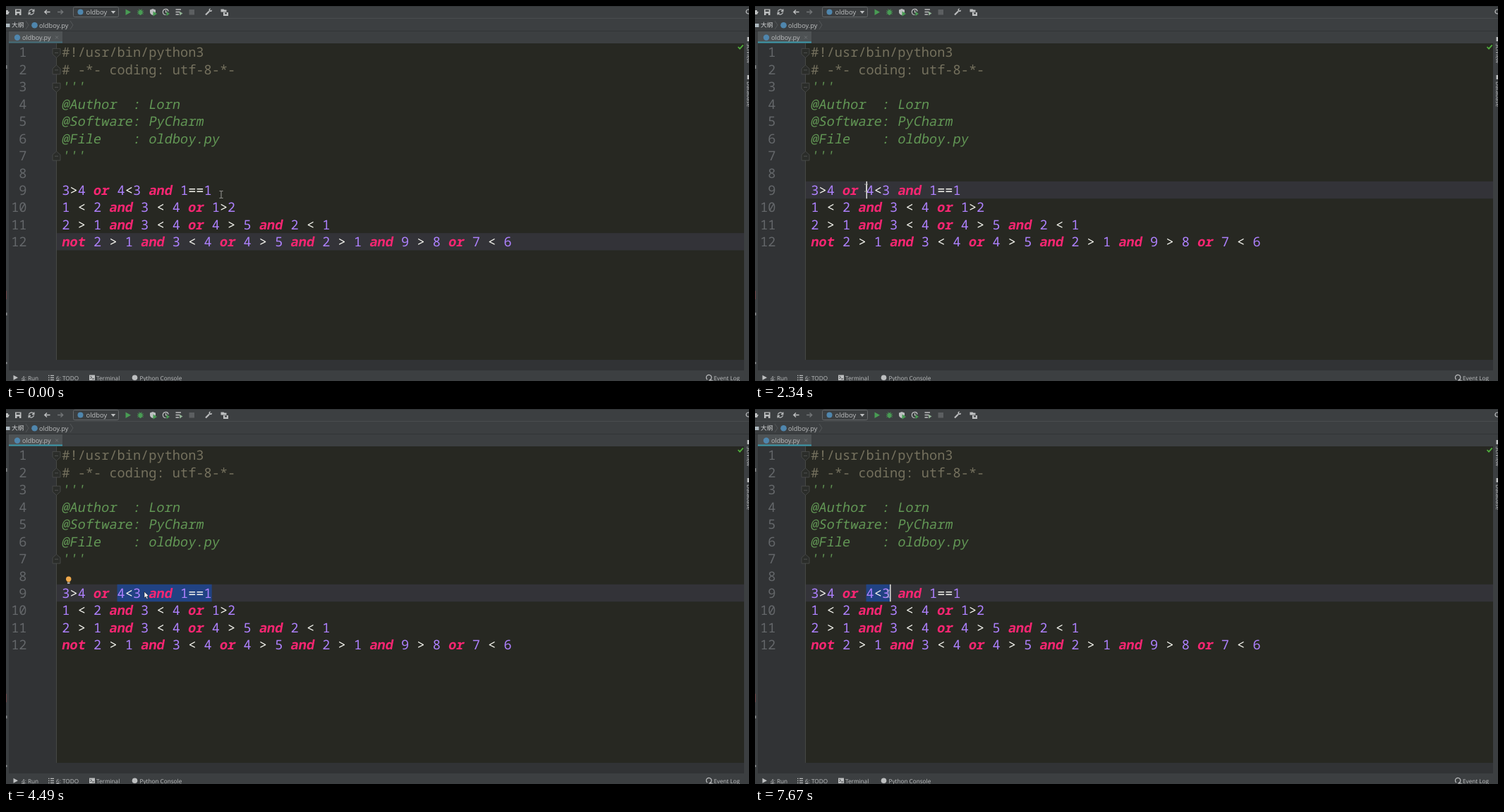
Write an HTML page with a canvas that moves like this. It is 1053 by 532 pixels and loops after 8 s.

```html
<!DOCTYPE html>
<html lang="en">
<head>
<meta charset="utf-8">
<title>Code editor</title>
<style>
  html, body { margin: 0; width: 100%; height: 100%; overflow: hidden; background: #3c3f41; }
  canvas { display: block; }
</style>
</head>
<body>
<canvas id="stage" width="1053" height="532"></canvas>
<script>
const ctx = document.getElementById('stage').getContext('2d');
const LOOP = 8000, STEP = 120;
const LEFT = 79.3, CHAR = 11.18, ROW = 24.45, TOP = 53.2;
const MONO = "18.63px 'Noto Sans Mono', monospace";
const UI = "'Open Sans', 'Noto Sans', sans-serif";
const CJK = "'Noto Sans CJK SC', 'Noto Sans CJK', sans-serif";
const LIGHT = '#bdbfc0', PANEL = '#3c3f41', GUTTER = '#313335';

const code = [
  '#!/usr/bin/python3',
  '# -*- coding: utf-8-*-',
  "'''",
  '@Author  : Lorn',
  '@Software: PyCharm',
  '@File    : oldboy.py',
  "'''",
  '',
  '3>4 or 4<3 and 1==1',
  '1 < 2 and 3 < 4 or 1>2',
  '2 > 1 and 3 < 4 or 4 > 5 and 2 < 1',
  'not 2 > 1 and 3 < 4 or 4 > 5 and 2 > 1 and 9 > 8 or 7 < 6'
];

// Pointer moves: start time, number of steps, destination x and y.
const moves = [
  [120, 2, 201.5, 261], [510, 3, 213.5, 269], [1030, 1, 214, 273],
  [1180, 3, 176.5, 265], [1570, 3, 163, 261], [2060, 1, 157.5, 258],
  [2610, 1, 176, 258], [2760, 2, 213.5, 258], [3030, 2, 261.5, 258],
  [3300, 3, 295, 257], [4100, 3, 202, 258], [4490, 3, 184, 261],
  [6540, 2, 154.5, 257.5], [7130, 1, 155, 257], [7400, 2, 188.5, 262],
  [7670, 1, 189, 262]
];

const rowTop = row => TOP + (row - 1) * ROW;
const colX = col => LEFT + col * CHAR;
const within = (t, from, to) => t >= from && t < to;

function pointerAt(t) {
  let x = 305, y = 267.5;
  for (const [start, steps, toX, toY] of moves) {
    if (t < start) break;
    const part = Math.min(1, (Math.floor((t - start) / STEP) + 1) / steps);
    x += (toX - x) * part;
    y += (toY - y) * part;
  }
  return { x, y, arrow: within(t, 4100, 6540) };
}

// Caret column and end of the selection that starts at column 7.
function editAt(t, pointer) {
  const column = Math.min(19, Math.round((pointer.x - LEFT) / CHAR));
  if (t < 2340) return { caret: -1, end: 7 };
  if (t < 4100 || t >= 7280) return { caret: column, end: column };
  if (t < 6150) {
    const hidden = t < 4730 || within(t, 5290, 5720);
    return { caret: hidden ? -1 : 19, end: 19 };
  }
  return { caret: 9, end: t < 6390 ? 19 : 7 };
}

function rect(x, y, w, h, color) {
  ctx.fillStyle = color;
  ctx.fillRect(x, y, w, h);
}

function disc(x, y, r, color) {
  ctx.fillStyle = color;
  ctx.beginPath();
  ctx.arc(x, y, r, 0, 7);
  ctx.fill();
}

function shape(x, y, d, color, width) {
  ctx.save();
  ctx.translate(x, y);
  const path = new Path2D(d);
  if (width) {
    ctx.strokeStyle = color;
    ctx.lineWidth = width;
    ctx.stroke(path);
  } else {
    ctx.fillStyle = color;
    ctx.fill(path);
  }
  ctx.restore();
}

function label(text, x, y, size, color = LIGHT, family = UI) {
  ctx.font = `${size}px ${family}`;
  ctx.fillStyle = color;
  ctx.fillText(text, x, y);
}

// Draws text on the character grid; slanted text leans about its middle height.
function cells(text, col, row, color, { slant = 0, weight = 400 } = {}) {
  ctx.font = `${weight} ${MONO}`;
  ctx.fillStyle = color;
  ctx.save();
  ctx.translate(colX(col), rowTop(row) + 19.2);
  ctx.transform(1, 0, -slant, 1, -slant * 5, 0);
  [...text].forEach((c, i) => ctx.fillText(c, i * CHAR, 0));
  ctx.restore();
}

function drawToolbar() {
  rect(0, 0, 1053, 1, '#323537');
  rect(0, 17, 1053, 1, '#4a4d4f');
  rect(0, 35, 1053, 1, '#323537');
  shape(0, 9, 'M0-3H3V-1H5L3 3H0Z', LIGHT);
  rect(13, 4.5, 8.5, 8.5, LIGHT);
  rect(14.7, 5.7, 5, 2.3, PANEL);
  rect(15.5, 10.5, 3.5, 2.5, PANEL);
  shape(36, 8.5, 'M-3.5-.5A3.6 3.6 0 0 1 3-2M3.5.5A3.6 3.6 0 0 1-3 2M3.8-4V-1H1M-3.8 4V1H-1', LIGHT, 1.3);
  shape(58.5, 8.5, 'M4 0H-3.5M-.5-3L-3.7 0L-.5 3', LIGHT, 1.4);
  shape(77, 8.5, 'M-4 0H3.5M.5-3L3.7 0L.5 3', '#727577', 1.4);
  shape(95.5, 1.5, 'M2 0H62Q64 0 64 2V12Q64 14 62 14H2Q0 14 0 12V2Q0 0 2 0Z', '#646769', 1);
  disc(105.5, 8.5, 4, '#4f86ad');
  label('oldboy', 113.5, 12, 9.4);
  shape(152, 9, 'M-3.3-2H3.3L0 2Z', LIGHT);
  shape(173, 8.8, 'M-3.5-4.2L4 0L-3.5 4.2Z', '#499c54');
  shape(190.5, 9, 'M-4-2.5L4 2.5M4-2.5L-4 2.5M-4.5 0H4.5M-2-4.5L0-2L2-4.5', '#499c54', 1);
  shape(190.5, 9, 'M-2.5-2Q0-5 2.5-2V2Q0 6-2.5 2Z', '#499c54');
  shape(208, 8.5, 'M-4-3L0-4.5L4-3V0Q3 3 0 4.5Q-4 3-4 0Z', LIGHT);
  shape(211, 11, 'M-2.5-3.5L3 0L-2.5 3.5Z', '#499c54');
  shape(226.5, 8.5, 'M3.7-1A4 4 0 1 0 0 4M0-2.5V.3H2', LIGHT, 1.2);
  shape(229.5, 11, 'M-2-3L2.5 0L-2 3Z', '#499c54');
  shape(245, 8.5, 'M-4.5-3.5H3M-4.5 0H1M-4.5 3.5H0', LIGHT, 1.3);
  shape(247.5, 10.5, 'M-1.5-3L3 0L-1.5 3Z', '#8fae92');
  rect(259.5, 5, 7.5, 7.5, '#5c5f61');
  shape(287, 8.5, 'M-4 4L1-1', LIGHT, 2.2);
  shape(289, 6.5, 'M1-3A2.3 2.3 0 1 0 3-1L1 0L0-1Z', LIGHT);
  shape(308.5, 7.5, 'M-4-3H0L1-2H4V1H-4Z', LIGHT);
  shape(312, 11, 'M-4-2H3V3H-4Z', LIGHT);
  rect(310, 9.5, 3, 2, PANEL);
  shape(1052, 8, 'M3 0A3 3 0 1 1-3 0A3 3 0 1 1 3 0', LIGHT, 1.2);

  rect(0, 25, 5.5, 5, '#aeb9c0');
  label('大纲', 8, 30.3, 8.7, '#d0d2d3', CJK);
  shape(28, 27, 'M0-6L4 0L0 6', '#55585a', 1);
  disc(40.5, 27.3, 4.3, '#4f86ad');
  label('oldboy.py', 47, 30.5, 9.2);
  shape(91, 27, 'M0-6L4 0L0 6', '#55585a', 1);
}

function drawTab(focused) {
  rect(4, 36, 76, 16, '#4e5254');
  rect(4, 50.5, 76, 2, focused ? '#3d9aab' : '#456f7a');
  disc(16, 44.8, 4.2, '#4f86ad');
  label('oldboy.py', 23, 48, 9);
  shape(72, 44.5, 'M-2-2L2 2M2-2L-2 2', '#707476', 0.9);
}

function drawStatusBar() {
  rect(4, 502, 1042, 15, GUTTER);
  shape(13.5, 527.3, 'M-3-3.5L3.5 0L-3 3.5Z', LIGHT);
  label('4: Run', 22, 530.5, 8.2);
  rect(22, 531, 4.5, 0.8, LIGHT);
  shape(64, 527.3, 'M-4-3H-2.5M-1-3H4M-4 0H-2.5M-1 0H4M-4 3H-2.5M-1 3H4', LIGHT, 1.3);
  label('6: TODO', 71, 530.5, 8.2);
  rect(71, 531, 4.5, 0.8, LIGHT);
  rect(118, 523.5, 8, 7.5, LIGHT);
  shape(121, 526.5, 'M-1.5-1.5L.5.5L-1.5 2.5M1 2.5H4', PANEL, 1);
  label('Terminal', 128, 530.5, 8.2);
  disc(182.5, 527.3, 3.8, LIGHT);
  label('Python Console', 189.5, 530.5, 8.2);
  shape(996, 527, 'M-2 3A3.7 3.7 0 1 1 2 3.2L4 4H0', LIGHT, 1.2);
  label('Event Log', 1003, 530.5, 8.2);
}

function drawSides() {
  rect(0, 84, 1.5, 5, '#85888a');
  rect(0, 404, 1, 12, '#6b4446');
  rect(0, 435, 1.5, 4, '#85888a');
  rect(0, 505, 1.5, 3, '#85888a');
  for (const [text, y] of [['SciView', 53], ['Database', 107]]) {
    rect(1050.5, y - 9, 3, 6, LIGHT);
    ctx.save();
    ctx.translate(1050, y);
    ctx.rotate(Math.PI / 2);
    label(text, 0, 0, 8.2);
    ctx.restore();
  }
}

function drawFold(row, down) {
  ctx.save();
  ctx.translate(71.5, rowTop(row) + 13.2);
  if (!down) ctx.scale(1, -1);
  const d = 'M-5.5-6H5.5V2L0 7L-5.5 2Z';
  shape(0, 0, d, '#2b2d2a');
  shape(0, 0, d, '#4d4f4d', 0.8);
  shape(0, 0, 'M-2.5 0H2.5', '#585a58', 0.8);
  ctx.restore();
}

function drawCode() {
  code.forEach((text, i) => {
    const row = i + 1, number = String(row);
    cells(number, (29.5 - LEFT) / CHAR - number.length, row, '#64676a');
    if (row <= 2) cells(text, 0, row, '#75715e');
    else if (row <= 7) cells(text, 0, row, '#629755', { slant: 0.18 });
    else for (const token of text.matchAll(/[a-z]+|\d|[<>=]+/g)) {
      const word = token[0];
      if (/[a-z]/.test(word)) cells(word, token.index, row, '#f92672', { slant: 0.18, weight: 700 });
      else cells(word, token.index, row, /\d/.test(word) ? '#ae81ff' : '#f8f8f2');
    }
  });
}

function drawBulb() {
  disc(88.7, 241.2, 3.7, '#f0a94b');
  rect(86.9, 244, 3.6, 1.5, '#f0a94b');
  rect(86.9, 246, 3.6, 1.8, '#b4b6b6');
}

function drawPointer({ x, y, arrow }) {
  if (arrow) {
    const d = 'M0 0V9L2.1 7.2L3.6 10.6L5.2 9.9L3.7 6.6H6.4Z';
    shape(x, y, d, '#ffffff');
    shape(x, y, d, '#15181c', 0.6);
  } else {
    shape(x, y, 'M-2.5-5H-.7L0-4.4L.7-5H2.5M0-4.4V4.4M-2.5 5H-.7L0 4.4L.7 5H2.5', '#c4c5c2', 0.75);
  }
}

function draw(t) {
  const pointer = pointerAt(t), edit = editAt(t, pointer);
  const focused = t >= 2340;

  rect(0, 0, 1053, 532, PANEL);
  drawToolbar();
  drawTab(focused);
  rect(4, 53, 67, 449, GUTTER);
  rect(71, 53, 975, 449, '#272822');
  rect(72, rowTop(focused ? 9 : 12), 974, ROW, '#333338');
  rect(71, 53, 1, 449, '#464846');
  if (edit.end > 7) rect(colX(7), rowTop(9), (edit.end - 7) * CHAR, ROW, '#214283');
  drawFold(1, true);
  drawFold(2, false);
  drawFold(3, true);
  drawFold(7, false);
  drawCode();
  shape(1041, 58, 'M-3.5 0L-1 2.7L3.7-2.7', '#4fae3c', 1.8);
  drawSides();
  drawStatusBar();

  if (edit.caret >= 0) rect(colX(edit.caret), rowTop(9), 1.4, ROW, '#f0f0ee');
  if (within(t, 4100, 6150) || within(t, 7130, 7280)) drawBulb();
  drawPointer(pointer);
}

ctx.textRendering = 'geometricPrecision';
const begin = performance.now();
function tick() {
  draw((performance.now() - begin) % LOOP);
  requestAnimationFrame(tick);
}
tick();
</script>
</body>
</html>
```
